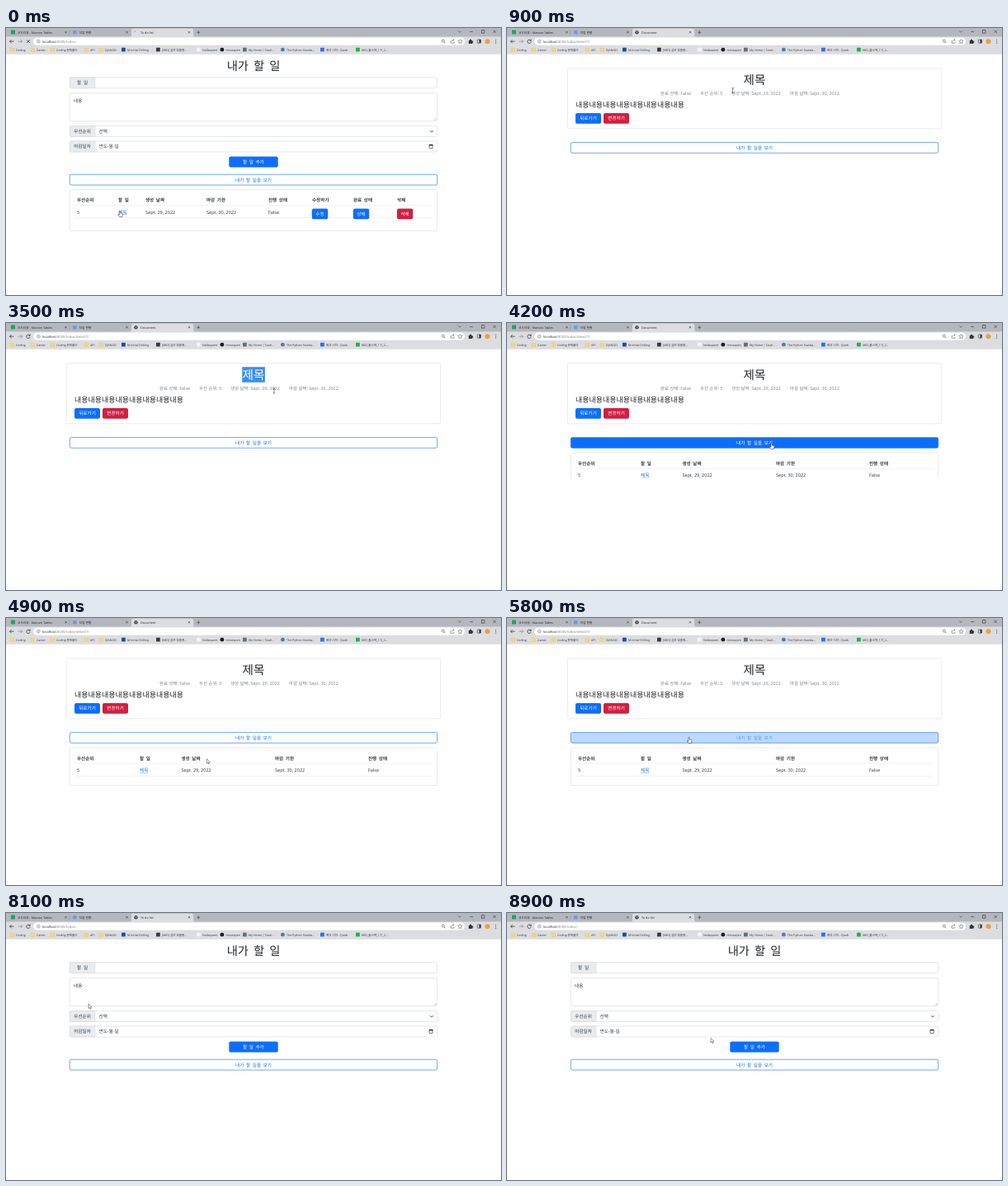
An HTML page for the animation above (9 s loop, 600 by 323 pixels).

```html
<!DOCTYPE html>
<html lang="ko">
<head>
<meta charset="utf-8">
<title>To do list</title>
<style>
html, body { margin: 0; width: 100%; height: 100%; overflow: hidden; background: #fff; }
svg { display: block; width: 600px; height: 323px; }
text { font-family: "Open Sans", "Noto Sans CJK KR", "Noto Sans CJK JP", "Noto Sans CJK", sans-serif; white-space: pre; text-rendering: geometricPrecision; }
.ko { word-spacing: 1.2px; }
</style>
</head>
<body>
<svg id="stage" viewBox="0 0 600 323" xmlns="http://www.w3.org/2000/svg"></svg>
<script>
const INK = '#30353a', BLUE = '#0d6efd', RED = '#d11f40', LINE = '#d3d8dd', GREY = '#7a8188';
const LOOP = 9000, STEP = 100;

// Drawing helpers
const text = (x, y, s, size = 5.55, fill = INK, extra = '') =>
  `<text x="${x}" y="${y}" font-size="${size}" fill="${fill}" ${extra}>${s}</text>`;
const mid = (x, y, s, size, fill, extra = '') =>
  text(x, y, s, size, fill, `text-anchor="middle" class="ko" ${extra}`);
const rect = (x, y, w, h, fill, stroke = 'none', r = 0, extra = '') =>
  `<rect x="${x}" y="${y}" width="${w}" height="${h}" rx="${r}" fill="${fill}" stroke="${stroke}" stroke-width=".6" ${extra}/>`;
const dot = (x, y, r, fill, extra = '') => `<circle cx="${x}" cy="${y}" r="${r}" fill="${fill}" ${extra}/>`;
const path = (d, stroke = '#4a4c50', w = .7, fill = 'none', extra = '') =>
  `<path d="${d}" stroke="${stroke}" stroke-width="${w}" fill="${fill}" ${extra}/>`;
const group = (id, body, extra = '') => `<g id="${id}" ${extra}>${body}</g>`;
const cross = (x, y, r, w = .6) => path(`M${x - r} ${y - r}l${2 * r} ${2 * r}m0 ${-2 * r}l${-2 * r} ${2 * r}`, '#333', w);
const button = (x, y, w, label, fill) =>
  rect(x, y, w, 12.8, fill, 'none', 2) + mid(x + w / 2, y + 8.5, label, 5.6, '#fff');
const globe = (x, y) => dot(x, y, 2.2, '#3f4246') + path(`M${x - 1.3} ${y - .8}l1.2 .5l.4 1.3M${x + .4} ${y - 1.6}l1 1.2`, '#d8d9dd', .6);

function tabs() {
  return rect(0, 0, 600, 11, '#b5b7be')
    + rect(6, 2.6, 5, 5, '#1fa463', 'none', .6) + text(14, 6.7, '코드리뷰 - Maroon Tables', 3.7, '#26282b')
    + cross(72.5, 5.2, 1.2) + path('M77 2.5v6', '#8b8d94', .5)
    + rect(81, 3, 4.6, 4.6, '#6b9be8', 'none', 1) + text(88.5, 6.7, '작업 현황', 3.8, '#26282b')
    + cross(146.5, 5.2, 1.2)
    + path('M150 11q2 0 2-2V3q0-2.2 2.2-2.2H225q2.2 0 2.2 2.2v6q0 2 2 2z', 'none', 0, '#dcdde1')
    + group('globe', globe(157.5, 5.3))
    + group('spin', path('M155.7 5.3a1.8 1.8 0 0 1 1.8-1.8', '#8d9096', .6))
    + text(163, 6.7, '', 3.8, '#26282b', 'id="tab"')
    + cross(222, 5.2, 1.2) + path('M231.3 5.3h4m-2-2v4', '#333', .6)
    + path('M548.3 3.6l1.7 1.7l1.7-1.7M562 4.6h4', '#333', .6)
    + rect(576.5, 2.7, 3.4, 3.4, 'none', '#333') + cross(592.2, 4.4, 1.7);
}

function toolbar() {
  return rect(0, 10.5, 600, 21.3, '#dcdde1')
    + rect(33, 11.4, 523, 9.4, '#fff', 'none', 4.7)
    + path('M9.5 16.2h-5m2.1-2.1l-2.1 2.1l2.1 2.1', '#3c3e42', .8)
    + path('M14.7 16.2h5m-2.1-2.1l2.1 2.1l-2.1 2.1', '#8c8f95', .8)
    + group('reload', path('M28.7 15a2.2 2.2 0 1 0 .4 1.8M29.2 13.5v1.9h-1.9', '#3c3e42', .8))
    + group('stop', cross(27, 16.2, 1.8, .8))
    + dot(39.3, 16.2, 1.9, 'none', 'stroke="#5f6368" stroke-width=".5"') + path('M39.3 15.9v1.3m0-2.2v.4', '#5f6368', .6)
    + `<text x="44" y="17.7" font-size="4.05" fill="#24262a">localhost<tspan id="url" fill="#7b7f85"></tspan></text>`
    + dot(529.8, 15.6, 1.5, 'none', 'stroke="#4a4c50" stroke-width=".6"') + path('M531 16.8l1.5 1.5', '#4a4c50', .7)
    + path('M539 15v3.2h4V16.5M540.3 16.4q.3-2 2.6-2m-1-1l1.2 1l-1.2 1', '#4a4c50', .5)
    + path('M550.5 13.6l.8 1.7l1.8.2l-1.3 1.3l.3 1.9l-1.6-.9l-1.6.9l.3-1.9l-1.3-1.3l1.8-.2z', '#4a4c50', .5)
    + path('M560.8 14.9h1.2q0-1.5 1.1-1.5t1.1 1.5h1.2v1.2q1 0 1 .8t-1 .8v1.3h-4.6z', 'none', 0, '#35373b')
    + rect(571.4, 14, 4, 4.2, 'none', '#35373b', .4) + rect(573.5, 14, 2, 4.2, '#35373b')
    + dot(583.5, 16.2, 3, '#eda13b')
    + [14.2, 16.2, 18.2].map(y => dot(593.7, y, .55, '#35373b')).join('');
}

// [icon x, label, icon colour, round?]; no colour means a folder
const MARKS = [
  [5, 'Coding'], [30, 'Career'], [54, 'Coding 문제풀이'], [95, 'API'], [113, 'DJANGO'],
  [140, 'M-Initial Drilling', '#1d4f9f'], [182, '[MID] 실무 맞춤형...', '#3a3a3a'],
  [231, 'Nollaquent', '#f4f4f4'], [259.5, 'mirutapen', '#1b1d20', 1],
  [287, 'My Home | Tavel...', '#66707c'], [333, 'The Python Standa...', '#4f7f9f', 1],
  [381, '회의 시작 - Quob', '#2d6ff0'], [424, 'MID_풀스택_1기_2...', '#22b04b']
];
const bookmarks = () => MARKS.map(([x, label, color, round]) => {
  const icon = !color ? path(`M${x} 24h1.7l.6.7h2.5v3.7H${x}z`, '#e3b84c', .3, '#f6d77a')
    : round ? dot(x + 2.4, 26.2, 2.4, color) : rect(x, 23.8, 4.8, 4.8, color, 'none', .5);
  return icon + text(x + 7, 27.5, label, 3.55, '#303236');
}).join('');

function table(y, cols, heads, cells) {
  return heads.map((h, i) => text(cols[i], y, h, 5.55, INK, 'font-weight="700" class="ko"')).join('')
    + cells.map((c, i) => i === 1
      ? text(cols[1], y + 14.7, c, 5.6, BLUE) + path(`M${cols[1]} ${y + 15.7}h10.4`, BLUE, .4)
      : text(cols[i], y + 14.7, c)).join('')
    + path(`M83 ${y + 4.5}H516.5M83 ${y + 19.7}H516.5`, '#dee2e6', .5);
}
const HEADS = ['우선순위', '할 일', '생성 날짜', '마감 기한', '진행 상태'];
const ROW = ['5', '제목', 'Sept. 29, 2022', 'Sept. 30, 2022', 'False'];
const showAll = (y, id) => rect(77.3, y, 445.4, 12.8, '#fff', BLUE, 2, `id="${id}"`)
  + mid(300, y + 8.4, '내가 할 일을 보기', 5.6, BLUE, `id="${id}Text"`);

function field(y, label, value) {
  return rect(77.3, y, 445.4, 13, '#fff', LINE, 2)
    + path(`M108 ${y}H79.3q-2 0-2 2v9q0 2 2 2H108z`, LINE, .6, '#e9ecef')
    + mid(92.6, y + 8.5, label, 5.6, INK) + text(112.5, y + 8.5, value, 5.6);
}

function listPage() {
  const cols = [86, 136, 169, 243, 318, 371, 421, 474];
  return mid(300, 51.3, '내가 할 일', 14.3, '#212529', 'style="word-spacing:2.3px"')
    + field(59.7, '할 일', '')
    + rect(77.3, 78.6, 445.4, 34, '#fff', LINE, 2) + text(82, 90.1, '내용', 5.6)
    + path('M519 111.6l2.6-2.6m-1.1 2.6l1.1-1.1', '#777', .4)
    + field(118.4, '우선순위', '선택') + path('M513.8 124.1l2 2l2-2', '#343a40', .8)
    + field(136.9, '마감일자', '연도-월-일')
    + rect(513, 141.2, 4.2, 4.2, 'none', '#222', .4) + rect(512.9, 141, 4.4, 1.3, '#222')
    + button(270.3, 155.6, 59.4, '할 일 추가', BLUE)
    + showAll(177.2, 'listBtn')
    + group('listTable', rect(77.3, 195.6, 445.4, 49.8, '#fff', '#dedede', 2)
      + table(209.9, cols, [...HEADS, '수정하기', '완료 상태', '삭제'], ROW)
      + button(370.8, 218.4, 19.4, '수정', BLUE) + button(420.8, 218.4, 19.4, '상태', BLUE)
      + button(474, 218.4, 19.2, '삭제', RED));
}

function detailPage() {
  const meta = [[186, '완료 상태: False'], [234, '우선 순위: 5'],
    [272, '생성 날짜: Sept. 29, 2022'], [343, '마감 날짜: Sept. 30, 2022']];
  return rect(73.3, 48.8, 453.4, 73, '#fff', '#dedede', 2)
    + rect(286.3, 53.2, 27.6, 18.6, '#3b8eed', 'none', 0, 'id="mark"')
    + mid(300, 68, '제목', 14.6, '#212529', 'id="head"')
    + meta.map(([x, s]) => text(x, 80.6, s, 5.45, GREY)).join('')
    + text(83, 95.8, '내용'.repeat(8), 8.97, '#212529')
    + button(83, 102.9, 31, '뒤로가기', BLUE) + button(117, 102.9, 31, '변경하기', RED)
    + showAll(138.4, 'btn')
    + '<clipPath id="fold"><rect id="foldBox" x="70" y="156" width="460" height="0"/></clipPath>'
    + group('drawer', rect(77.3, 157, 445.4, 45.5, '#fff', '#dedede', 2)
      + table(171.5, [86, 162, 212.5, 326, 439], HEADS, ROW), 'clip-path="url(#fold)"');
}

const CURSORS = {
  arrow: path('M0 0v5.4l1.3-1.1l.9 2l.9-.4l-.9-1.9h1.7z', '#222', .45, '#fff'),
  hand: path('M-.6 .5q.6-.9 1.2 0v2.3l2.3.6q.8.3.6 1.2l-.6 2.9h-3.3l-2-2.6q.2-.9 1.8.2z', '#222', .5, '#fff'),
  beam: path('M-1.2-3h1l.2.3l.2-.3h1M0-2.7v5.4M-1.2 3h1l.2-.3l.2.3h1', '#111', .55)
};

const stage = document.getElementById('stage');
stage.innerHTML = rect(0, 0, 600, 323, '#fff') + tabs() + toolbar() + bookmarks()
  + group('list', listPage()) + group('detail', detailPage())
  + group('cursor', Object.entries(CURSORS).map(([k, v]) => group(k, v)).join(''));

const $ = id => document.getElementById(id);
const show = (id, on) => $(id).setAttribute('display', on ? 'inline' : 'none');
const set = (id, name, value) => $(id).setAttribute(name, value);

// CSS "ease" curve
function ease(x) {
  if (x <= 0) return 0;
  if (x >= 1) return 1;
  let lo = 0, hi = 1, u;
  for (let i = 0; i < 24; i++) {
    u = (lo + hi) / 2;
    if (.75 * u * (1 - u) + u ** 3 < x) lo = u; else hi = u;
  }
  return .3 * u * (1 - u) ** 2 + 3 * u * u * (1 - u) + u ** 3;
}
const ramp = (t, from, span) => ease((t - from) / span);
const mix = (a, b, k) => `rgb(${a.map((v, i) => Math.round(v + (b[i] - v) * k))})`;

// [time, x, y, shape from here on]
const MOVES = [
  [0, 138, 221, 'hand'], [100, 138, 221, 'arrow'], [300, 138, 221, 'arrow'], [700, 225, 95, 'beam'],
  [1000, 298, 66, 'beam'], [1300, 212, 79, 'beam'], [1500, 300, 79, 'beam'], [1900, 105, 94, 'beam'],
  [2100, 105, 94, 'beam'], [2500, 287, 63, 'beam'], [2800, 314, 64, 'beam'], [3100, 316, 66, 'beam'],
  [3500, 325, 82, 'beam'], [3700, 325, 112, 'arrow'], [3900, 321, 141, 'hand'], [4000, 320.5, 145, 'hand'],
  [4500, 320.5, 145, 'hand'], [4700, 300, 155, 'arrow'], [5000, 215, 178, 'beam'], [5300, 167, 182, 'hand'],
  [5450, 167, 182, 'arrow'], [5780, 220.5, 144, 'hand'], [6300, 220.5, 144, 'hand'], [6400, 205, 136, 'arrow'],
  [6900, 135.7, 114.8, 'arrow'], [7050, 135.7, 114.8, 'arrow'], [7300, 100, 110, 'hand'], [7900, 100, 110, 'arrow'],
  [8100, 100, 110, 'arrow'], [8500, 205, 140, 'arrow'], [8900, 247, 151.3, 'arrow']
];
function pointer(t) {
  let i = MOVES.length - 1;
  while (MOVES[i][0] > t) i--;
  const [t0, x0, y0, shape] = MOVES[i], [t1, x1, y1] = MOVES[i + 1] || [LOOP, x0, y0];
  const k = (t - t0) / (t1 - t0);
  return { x: x0 + (x1 - x0) * k, y: y0 + (y1 - y0) * k, shape };
}

function draw(t) {
  const first = t < 100, list = first || t >= 7900;
  const loading = first || (t >= 7800 && t < 7900);
  show('list', list);
  show('detail', !list);
  show('listTable', first);
  show('reload', !loading);
  show('stop', loading);
  show('globe', !loading);
  show('spin', loading);
  $('tab').textContent = list ? 'To do list' : 'Document';
  $('url').textContent = ':8000/todos/' + (list ? '' : 'detail/7/');

  const chosen = t >= 2700 && t < 3700;
  show('mark', chosen);
  set('head', 'fill', chosen ? '#fff' : '#212529');

  const hover = ramp(t, 3860, 150) - ramp(t, 4600, 150) + ramp(t, 5772, 150) - ramp(t, 6330, 150);
  set('btn', 'fill', mix([255, 255, 255], [13, 110, 253], hover));
  set('btnText', 'fill', mix([13, 110, 253], [255, 255, 255], hover));

  const open = ramp(t, 4063, 350) - ramp(t, 6063, 350);
  show('drawer', open > 0);
  set('foldBox', 'height', open * 47);

  const p = pointer(t);
  set('cursor', 'transform', `translate(${p.x.toFixed(2)} ${p.y.toFixed(2)})`);
  Object.keys(CURSORS).forEach(k => show(k, k === p.shape));
}

function tick() {
  draw(Math.floor(performance.now() % LOOP / STEP) * STEP);
  requestAnimationFrame(tick);
}
tick();
</script>
</body>
</html>
```
